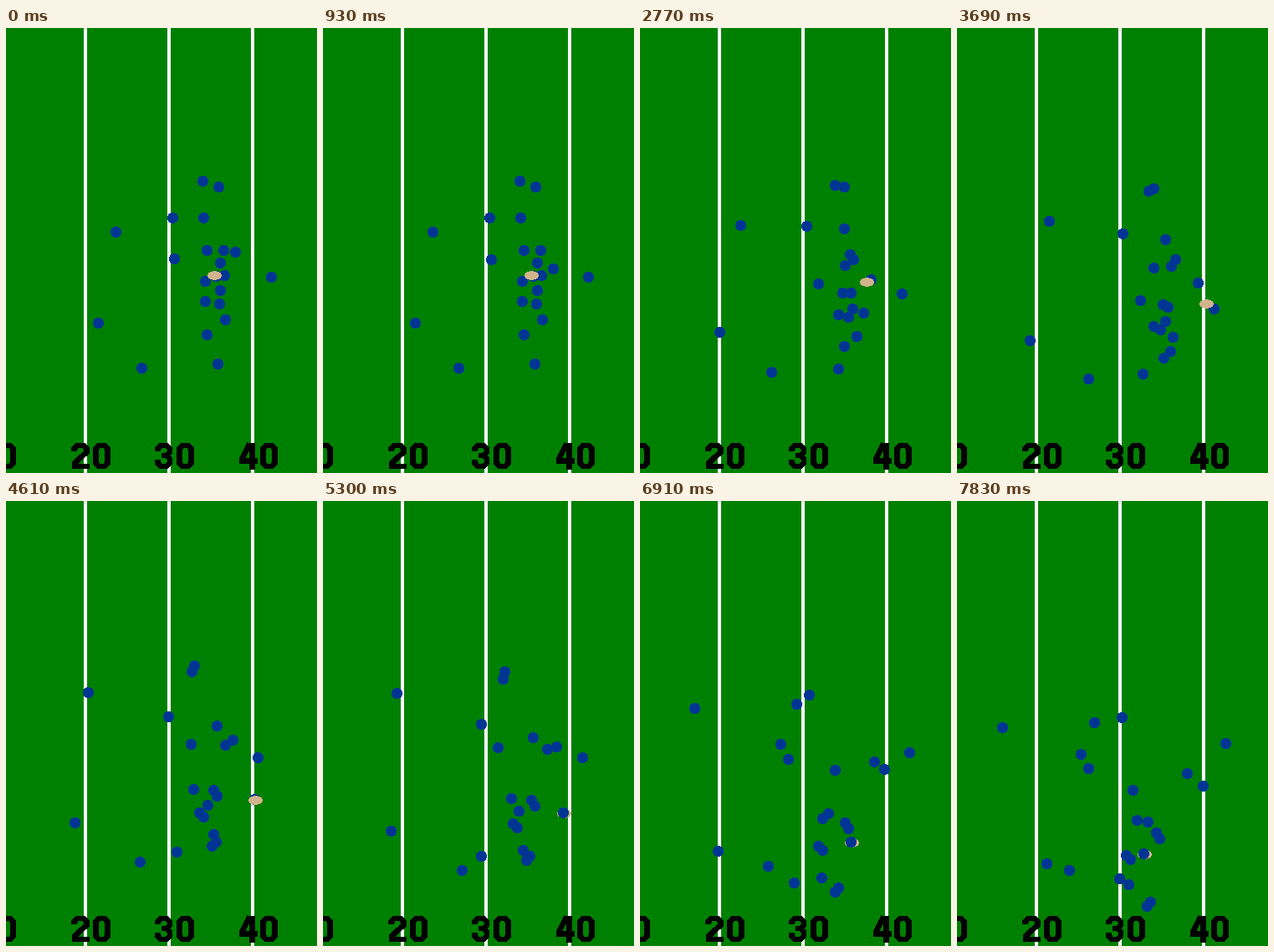
These frames come from a looping animation (372x533 px, 8 s). A matplotlib script:

```python
import numpy as np
import matplotlib.pyplot as plt
from matplotlib.animation import FuncAnimation
from matplotlib.patches import Circle, Ellipse

W, H, DPI = 372, 533, 100
LOOP_MS, TICK_MS, STEP_MS, LAST = 8000, 20, 230, 34
GRASS, NAVY, LEATHER = "#008000", "#003594", "#d2b48c"
SNAP = 3  # step at which the play starts
SWAP = 23  # from this step the carrier covers the ball
STEPS = np.arange(LAST + 1)


def run(*points, rolling=False):
    """Polynomial through the points; starts at rest unless already rolling."""
    keys = np.array((20, LAST) if len(points) == 3 else (12, 24, LAST))
    start, later = np.array(points[0], float), np.array(points[1:], float)
    t0 = 0 if rolling else SNAP
    powers = np.arange(len(keys)) + (1 if rolling else 2)

    def basis(k):
        s = np.clip((k - t0) / (LAST - t0), 0, 1)
        return s[:, None] ** powers

    return start + basis(STEPS) @ np.linalg.solve(basis(keys), later - start)


def ease(begin, end):
    s = np.clip((STEPS - begin) / (end - begin), 0, 1)[:, None]
    return s * s * (3 - 2 * s)


def engage(partner, before, after):
    """A player who closes in on a partner and then stays beside him."""
    before, after = np.array(before), np.array(after)
    return partner + before + ease(4, 22) * (after - before)


quarterback = run((261, 296), (301, 307), (321, 290))
carrier = run((317, 298), (297, 357), (223, 422))
lead = run((274, 268), (267, 341), (236, 424), (205, 459), rolling=True)

guard = run((238, 303), (248, 346), (238, 397))
tackle = run((238, 327), (231, 373), (202, 424))
end = run((262, 349), (251, 408), (231, 480))

tracks = [
    quarterback, lead, guard, tackle, end,
    engage(guard, (13, -6), (4, 7)),
    engage(tackle, (17, 3), (5, 5)),
    engage(end, (-22, 18), (-4, 5)),
    # blockers and rushers
    run((260, 266), (255, 277), (270, 299), (275, 326)),
    run((256, 281), (221, 291), (157, 320)),
    run((256, 314), (254, 336), (231, 373), (215, 382)),
    run((236, 227), (252, 269), (210, 346)),
    run((240, 266), (271, 286), (294, 341)),
    # receivers
    run((254, 190), (225, 197), (197, 259)),
    run((253, 402), (204, 420), (134, 442)),
    # coverage
    run((235, 183), (222, 204), (164, 265)),
    run((199, 227), (194, 258), (148, 303)),
    run((131, 244), (98, 229), (54, 271)),
    run((201, 276), (213, 306), (225, 359), (228, 384)),
    run((110, 353), (95, 364), (82, 398), (107, 434)),
    run((162, 407), (157, 412), (168, 445), (194, 452)),
]

# The ball leaves its spot and ends up in the carrier's hands
spot = np.array((249, 296.5))
ball_track = spot + ease(7.5, 19) * (carrier + (1, 1) - spot)

fig = plt.figure(figsize=(W / DPI, H / DPI), dpi=DPI, facecolor=GRASS)
ax = fig.add_axes([0, 0, 1, 1])
ax.set_xlim(0, W)
ax.set_ylim(H, 0)
ax.axis("off")


def stroke(xs, ys, width, color, z):
    ax.plot(xs, ys, color=color, lw=width * 72 / DPI, zorder=z,
            antialiased=False, solid_capstyle="butt", solid_joinstyle="miter")


# Block digits as thick strokes in a 22 x 31 box
GLYPHS = {
    "0": [[(3.5, 15), (3.5, 7), (7, 3), (14, 3), (17.5, 7), (17.5, 24),
           (14, 28), (7, 28), (3.5, 24), (3.5, 14)]],
    "2": [[(3.5, 10), (3.5, 7), (7, 3), (15, 3), (18.5, 7), (18.5, 11),
           (4, 24), (4, 28), (22, 28)]],
    "3": [[(3.5, 10), (3.5, 7), (7, 3), (14, 3), (18, 7), (18, 11),
           (14, 15), (8, 15)],
          [(8, 15), (14, 15), (18, 19), (18, 24), (14, 28), (7, 28),
           (3.5, 24), (3.5, 20)]],
    "4": [[(15.5, 0), (15.5, 31)], [(13, 1), (4, 20)], [(1, 21), (22, 21)]],
}


def label(text, left, top=497):
    for n, ch in enumerate(text):
        for pts in GLYPHS[ch]:
            x, y = np.array(pts).T
            stroke(x + left + 26 * n, y + top, 5.4, "black", 2)


for x in (95, 195, 295):
    stroke([x, x], [-5, H + 5], 4, "white", 1)
label("0", -9)
for n in (2, 3, 4):
    label(f"{n}0", 100 * n - 122)


# Hard-edged fills cover every pixel they touch, so sizes are slightly reduced
def add(shape, color, z, *size):
    return ax.add_patch(shape((0, 0), *size, fc=color, lw=0, zorder=z,
                              antialiased=False))


players = [add(Circle, NAVY, 3, 5.75) for _ in tracks]
runner = add(Circle, NAVY, 4, 5.75)
ball = add(Ellipse, LEATHER, 5, 15.6, 9.6)


def place(patch, track, k):
    patch.center = np.rint(track[k]) + 0.5


def draw(i):
    k = min(i * TICK_MS // STEP_MS, LAST)
    for player, track in zip(players, tracks):
        place(player, track, k)
    place(runner, carrier, k)
    place(ball, ball_track, k)
    runner.set_zorder(6 if k >= SWAP else 4)
    return [*players, runner, ball]


anim = FuncAnimation(fig, draw, frames=LOOP_MS // TICK_MS, interval=TICK_MS,
                     repeat=True, repeat_delay=0, blit=False)
plt.show()
```
